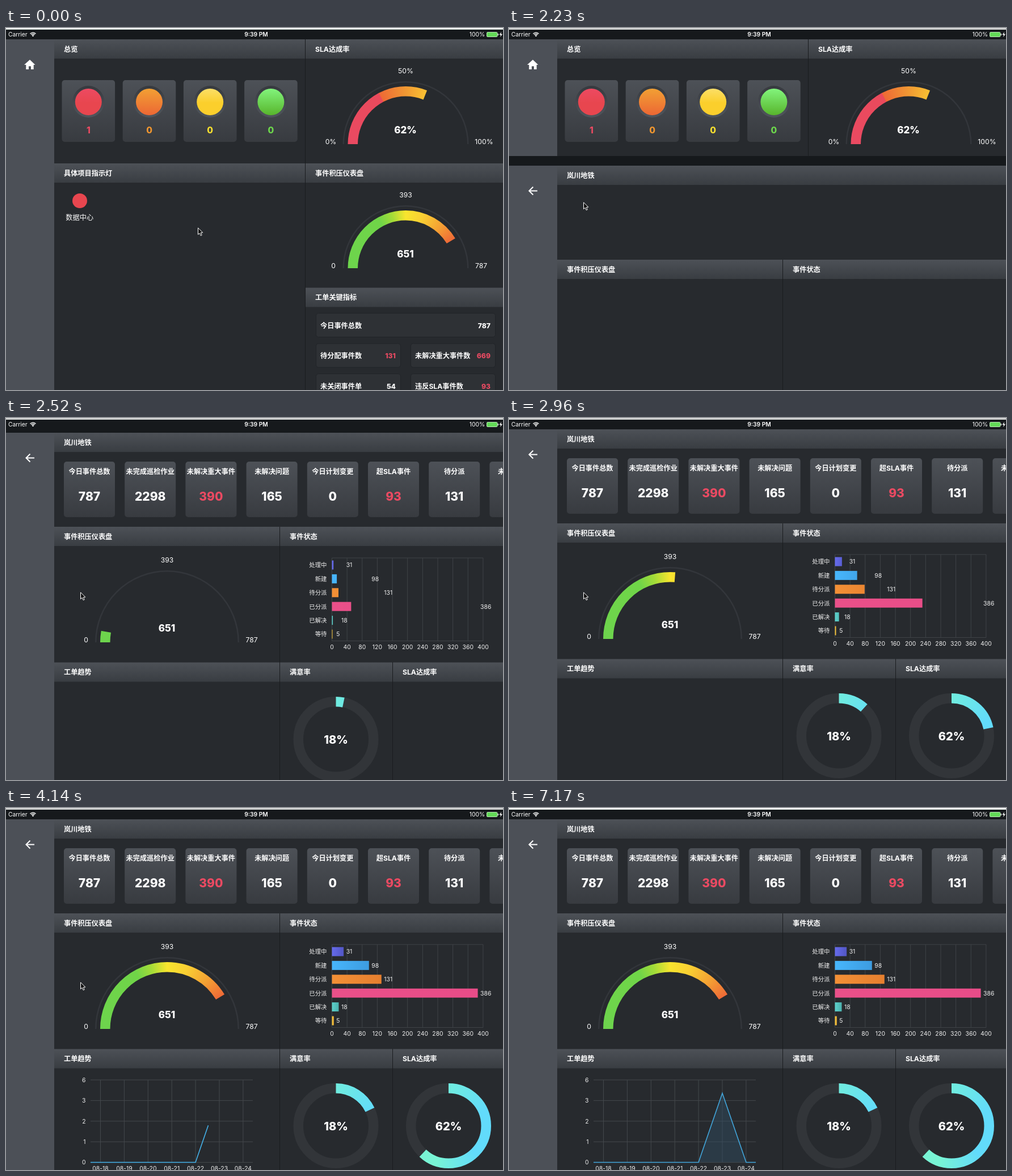
Recreate the animation shown at these times as an HTML page with a canvas. Size 876 px wide and 639 px high, loop 7.27 s.

```html
<!DOCTYPE html>
<html lang="zh-CN">
<head>
<meta charset="utf-8">
<style>
html, body { margin: 0; width: 876px; height: 639px; overflow: hidden; background: #272a2e; }
canvas { display: block; }
</style>
</head>
<body>
<canvas id="stage" width="876" height="639"></canvas>
<script>
const c = document.getElementById('stage').getContext('2d');
const LOOP = 7270, STEP = 148, START = 590, GROW = 949;
const BG = '#272a2e', DARK = '#1a1c1f', WHITE = '#fff', PINK = '#ea4a62';
const FONT = 'Inter, "Noto Sans CJK SC", "Noto Sans CJK", sans-serif';

const SLA_STOPS = [[0, PINK], [.172, '#ea4a5c'], [.174, '#ee6a35'], [.25, '#f09833'], [.31, '#f9c032']];
const LOAD_STOPS = [[0, '#6dd44d'], [.17, '#70d548'], [.21, '#a5dc38'], [.25, '#f8e52e'],
  [.3, '#f9cf33'], [.36, '#f4a033'], [.414, '#ee6937']];
const DONUT_STOPS = [[0, '#70ecdf'], [.19, '#62dbfb'], [.38, '#62dbfb'], [.55, '#78f4d5']];

// Cursor positions: [step, x, y]
const CURSOR = [[-9, 338, 352], [0, 326, 342], [1, 292, 321], [2, 238, 300], [3, 184, 289], [4, 148, 291],
  [5, 133, 300], [6, 129, 306], [7, 131, 307], [33, 590, 414], [36, 672, 452], [37, 781, 513],
  [39, 792, 530], [40, 820, 566], [41, 847, 618], [42, 900, 700]];

const clamp = v => Math.max(0, Math.min(1, v));

function rect(x, y, w, h, fill) {
  c.fillStyle = fill;
  c.fillRect(x, y, w, h);
}

function box(x, y, w, h, r, fill, border) {
  c.beginPath();
  c.roundRect(x, y, w, h, r);
  c.fillStyle = fill;
  c.fill();
  if (border) { c.strokeStyle = border; c.lineWidth = 1; c.stroke(); }
}

function ramp(x0, y0, x1, y1, from, to) {
  const g = c.createLinearGradient(x0, y0, x1, y1);
  g.addColorStop(0, from);
  g.addColorStop(1, to);
  return g;
}

function text(s, x, y, size = 12.2, weight = 400, color = WHITE, align = 'center') {
  c.font = `${weight} ${size}px ${FONT}`;
  c.textAlign = align;
  c.fillStyle = color;
  c.fillText(s, x, y + size * .37);
}

function disc(x, y, r, fill) {
  c.beginPath();
  c.arc(x, y, r, 0, 2 * Math.PI);
  c.fillStyle = fill;
  c.fill();
}

function path(points, close) {
  c.beginPath();
  points.forEach(p => c.lineTo(...p));
  if (close) c.closePath();
}

function line(points, color, width = 1) {
  path(points);
  c.strokeStyle = color;
  c.lineWidth = width;
  c.stroke();
}

function ring(x, y, outer, width, from, turn, color) {
  if (turn <= 0) return;
  c.beginPath();
  c.arc(x, y, outer - width / 2, from, from + turn * 2 * Math.PI);
  c.strokeStyle = color;
  c.lineWidth = width;
  c.stroke();
}

function conic(x, y, from, stops) {
  const g = c.createConicGradient(from, x, y);
  stops.forEach(s => g.addColorStop(...s));
  return g;
}

function header(x, y, w, title) {
  rect(x, y, w, 34, ramp(0, y, 0, y + 34, '#4d5157', '#393d42'));
  text(title, x + 17, y + 17, 12.2, 700, WHITE, 'left');
}

function gauge(x, y, r, turn, stops, value, [min, mid, max], dx) {
  ring(x, y, r + 9, 2.5, Math.PI, .5, '#33363b');
  ring(x, y, r, 17.5, Math.PI, turn, conic(x, y, Math.PI, stops));
  text(mid, x, y - r - 27.5);
  text(min, x - dx[0], y - 5);
  text(max, x + dx[1], y - 5);
  text(value, x - .5, y - 25.5, 17, 800);
}

function donut(x, percent, grow) {
  ring(x, 561, 75, 17.5, 0, 1, '#323539');
  ring(x, 561, 75, 17.5, -Math.PI / 2, percent / 100 * grow, conic(x, 561, -Math.PI / 2, DONUT_STOPS));
  text(percent + '%', x, 561.5, 20, 800);
}

function frame() {
  rect(0, 3, 876, 636, BG);
  rect(0, 3, 876, 17, '#16191c');
  rect(0, 20, 85, 619, '#4c5057');
}

function metric(x, y, w, label, value, color) {
  box(x + .5, y + .5, w, 42, 4, '#2e3135', '#212428');
  text(label, x + 8, y + 22, 12.2, 700, WHITE, 'left');
  text(value, x + w - 8, y + 22, 12.2, 800, color, 'right');
}

function home() {
  frame();
  path([[42, 56], [51.5, 65], [48.7, 65], [48.7, 73], [44, 73], [44, 67.5], [40, 67.5], [40, 73],
    [35.3, 73], [35.3, 65], [32, 65]]);
  c.fillStyle = WHITE;
  c.fill();

  header(85, 20, 442, '总览');
  [['#ed4a62', '#e8464f', PINK, 1], ['#f2a034', '#ec6734', '#f0962f', 0],
    ['#fcdf68', '#fbcf2c', '#f8e02f', 0], ['#82f47c', '#58b52c', '#6dd84c', 0]
  ].forEach(([top, bottom, color, n], i) => {
    const x = 98.5 + i * 107.2, mid = x + 46.8;
    box(x, 92, 93.6, 109, 5, ramp(0, 92, 0, 201, '#4d5157', '#383b40'));
    disc(mid, 130, 28, ramp(0, 102, 0, 158, '#36393e', '#50565d'));
    const flat = i == 0 || i == 2;
    disc(mid, 130.5, 23.5, ramp(0, 107, 0, flat ? 132 : 154, top, bottom));
    text(n, mid, 180, 15.5, 800, color);
  });

  header(85, 239, 442, '具体项目指示灯');
  disc(130, 305, 13, '#e8464f');
  text('数据中心', 129.7, 334);

  rect(527, 20, 1, 619, DARK);
  header(528, 20, 348, 'SLA达成率');
  gauge(704.5, 205, 102, .31, SLA_STOPS, '62%', ['0%', '50%', '100%'], [132, 138]);
  header(528, 239, 348, '事件积压仪表盘');
  gauge(704.5, 424, 102, 651 / 787 / 2, LOAD_STOPS, '651', ['0', '393', '787'], [127.5, 133]);
  header(528, 458.5, 348, '工单关键指标');
  metric(546, 503, 316, '今日事件总数', 787, WHITE);
  metric(546, 556.5, 149, '待分配事件数', 131, PINK);
  metric(713, 556.5, 149, '未解决重大事件数', 669, PINK);
  metric(546, 610, 149, '未关闭事件单', 54, WHITE);
  metric(713, 610, 149, '违反SLA事件数', 93, PINK);
}

function barChart(grow) {
  const x0 = 574.5, unit = .666, grid = '#3f4347';
  for (let v = 0; v <= 400; v += 40) {
    const x = x0 + v * unit;
    line([[x, 241], [x, 387.5]], grid);
    text(v, x, 398.5, 10.4, 400, '#eee');
  }
  for (const y of [241, 387.5]) line([[x0, y], [x0 + 400 * unit, y]], grid);
  [['处理中', 31, '#666bec', '#5256c4'], ['新建', 98, '#47b6fc', '#3d9ce0'],
    ['待分派', 131, '#f39036', '#e67f2f'], ['已分派', 386, '#ea5089', '#e84c88'],
    ['已解决', 18, '#5cd2cc', '#4cb0ad'], ['等待', 5, '#f6c83d', '#e6ab34']
  ].forEach(([name, n, from, to], i) => {
    const y = 253.5 + i * 24.4, w = n * unit;
    rect(x0, y - 8, Math.max(w * grow, 1), 16, ramp(x0, 0, x0 + w, 0, from, to));
    text(name, 565.5, y, 10.4, 400, '#eee', 'right');
    text(n, x0 + w + 4.5, y, 10.4, 400, '#eee', 'left');
  });
}

function trend(grow, fade) {
  const grid = '#44484c', top = 480, base = 625.5;
  [6, 3, 2, 1, 0].forEach((n, i) => {
    const y = top + i * 36.4;
    line([[149, y], [435, y]], grid);
    text(n, 140.5, y, 10.4, 400, '#eee', 'right');
  });
  for (let i = 0; i < 7; i++) {
    const x = 166.5 + i * 41.9;
    line([[x, top], [x, base]], grid);
    text('08-' + (18 + i), x, 636.5, 10.4, 400, '#eee');
  }
  const pts = [[149, base], [334, base], [376, 503.5], [418, base], [435, base]];
  c.globalAlpha = fade;
  path(pts, true);
  c.fillStyle = 'rgba(50, 78, 100, .45)';
  c.fill();
  c.globalAlpha = 1;
  const length = 185 + 2 * Math.hypot(42, 122) + 17;
  c.setLineDash([length * grow, 2 * length]);
  if (grow > 0) line(pts, fade ? '#42a5da' : '#45b2ea', 1.6);
  c.setLineDash([]);
}

function detail(time) {
  const grow = (start, span = GROW) => clamp((time - start) / span);
  frame();
  line([[42.5, 57.5], [35.5, 64.5], [42.5, 71.5]], WHITE, 2);
  line([[35.5, 64.5], [50, 64.5]], WHITE, 2);

  header(85, 20, 791, '岚川地铁');
  header(85, 186, 397, '事件积压仪表盘');
  header(483, 186, 393, '事件状态');
  header(85, 425.5, 397, '工单趋势');
  header(483, 425.5, 198, '满意率');
  header(682, 425.5, 194, 'SLA达成率');
  rect(482, 186, 1, 453, DARK);
  rect(681, 425, 1, 214, DARK);

  if (time > 2350) {
    [['今日事件总数', 787], ['未完成巡检作业', 2298], ['未解决重大事件', 390, PINK], ['未解决问题', 165],
      ['今日计划变更', 0], ['超SLA事件', 93, PINK], ['待分派', 131], ['未关闭事件', 54]
    ].forEach(([label, n, color], i) => {
      const x = 102 + i * 107.2;
      box(x, 71, 90, 98, 5, ramp(0, 71, 0, 169, '#4d5157', '#383b40'));
      text(label, x + 45, 88.5, 12.2, 700);
      text(n, x + 45, 132.5, 21, 800, color);
    });
    gauge(284, 390, 118, 651 / 787 / 2 * grow(2462, 782), LOAD_STOPS, '651', ['0', '393', '787'], [143, 149]);
    barChart(grow(2389));
    donut(581.5, 18, grow(2343));
  }
  if (time > 2600) donut(780, 62, grow(2624));
  if (time > 3500) trend(grow(3618), grow(4500, 150));
}

function statusBar(light) {
  rect(0, 0, 876, 2.5, light ? '#f2fbf6' : '#d0d1d1');
  text('Carrier', 4, 11.5, 10.3, 400, WHITE, 'left');
  for (const r of [6.8, 4.2]) {
    c.beginPath();
    c.arc(47.5, 15, r, -Math.PI * .76, -Math.PI * .24);
    c.strokeStyle = WHITE;
    c.lineWidth = 1.5;
    c.stroke();
  }
  disc(47.5, 13.7, 1.4, WHITE);
  text('9:39 PM', 441, 11.5, 10.3, 600);
  text('100%', 844, 11.5, 10.3, 400, WHITE, 'right');
  box(847.5, 7.5, 18.5, 8, 1.5, '#62d957', '#b9e8b4');
  rect(866.8, 10, 1.2, 3, WHITE);
  path([[873, 7], [869.5, 12], [872, 12], [871, 16], [875, 10.7], [872.3, 10.7]]);
  c.fillStyle = WHITE;
  c.fill();
}

function cursor(step) {
  const [, x, y] = CURSOR.findLast(p => p[0] <= step);
  path([[.5, .8], [.5, 12.6], [3.2, 10.2], [5.2, 14.5], [7.2, 13.6], [5.3, 9.4], [8.8, 9.2]]
    .map(([a, b]) => [x + a, y + b]), true);
  c.fillStyle = '#111';
  c.fill();
  c.strokeStyle = WHITE;
  c.lineWidth = 1;
  c.stroke();
}

function draw(t) {
  const step = Math.floor((t - START) / STEP + .05);
  const time = START + step * STEP;
  // Critically damped spring slides the detail page up.
  const s = Math.max(0, time - 2075) * .0155;
  const slide = Math.round(636 * (1 + s) * Math.exp(-s));
  if (slide) home();
  if (slide < 636) {
    c.save();
    c.translate(0, slide);
    detail(time);
    c.restore();
  }
  statusBar(t < 2080 || t >= 7170);
  cursor(step);
}

function tick() {
  draw(performance.now() % LOOP);
  requestAnimationFrame(tick);
}
tick();
</script>
</body>
</html>
```
